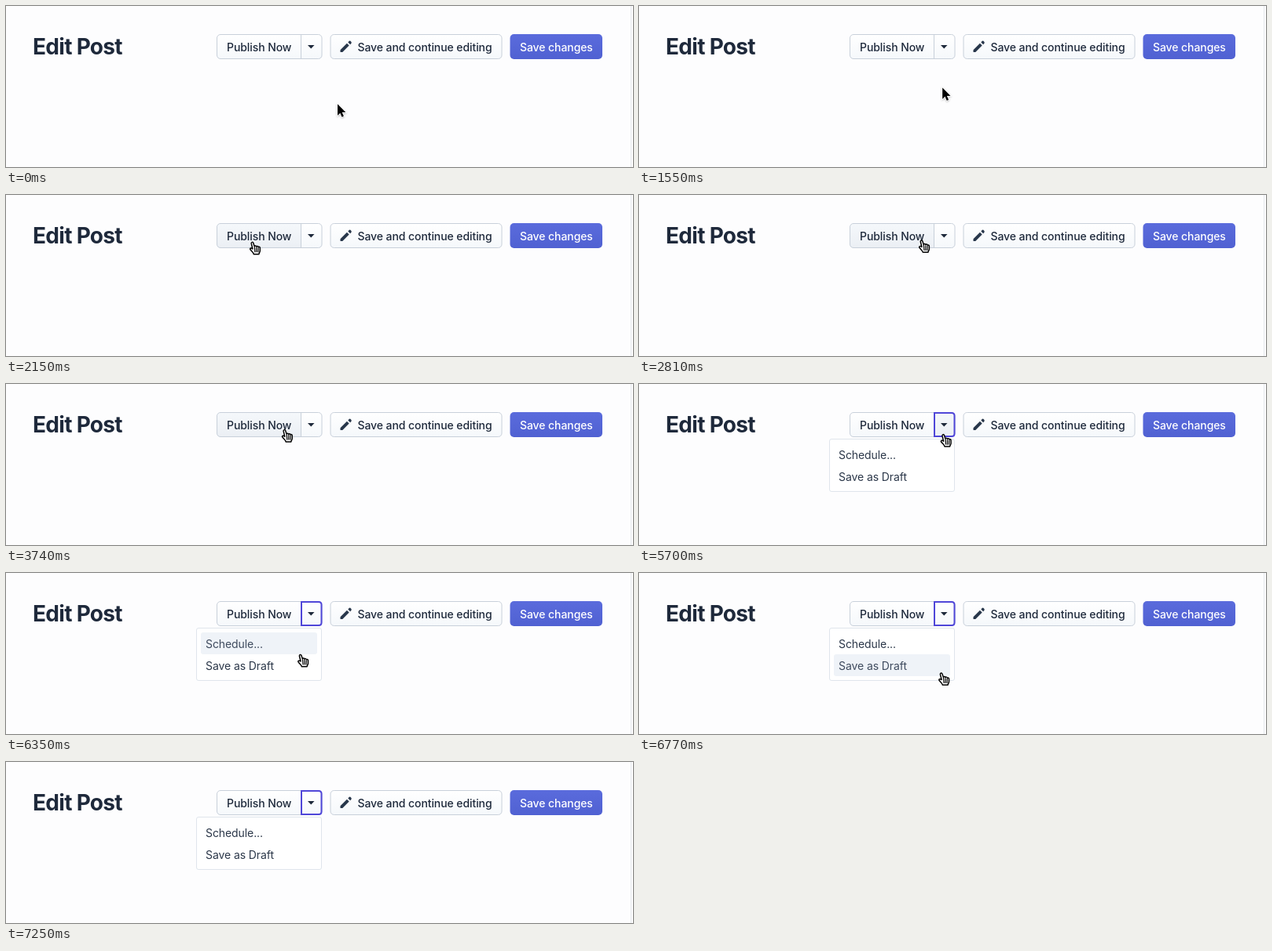
An HTML page that plays this animation: 798 px wide and 206 px high, repeating every 8.03 s.

```html
<!DOCTYPE html>
<html lang="en">
<head>
<meta charset="utf-8">
<title>Edit Post</title>
<style>
  html, body { margin: 0; width: 100%; height: 100%; overflow: hidden; background: #fdfdfe; }
  svg { display: block; }
  text { font: 500 14px Inter, sans-serif; letter-spacing: -.006em; fill: #1e293b; }
  .title { font-size: 28px; font-weight: 700; letter-spacing: -.025em; }
  .item { font-weight: 400; fill: #2b3749; }
  .item.hover { fill: #3f4b5e; }
  .edge { fill: none; stroke: #c8d0da; }
</style>
</head>
<body>
<svg width="798" height="206" viewBox="0 0 798 206">
  <defs>
    <linearGradient id="light" x2="0" y2="1"><stop stop-color="#fff"/><stop offset="1" stop-color="#f5f8fb"/></linearGradient>
    <linearGradient id="dim" x2="0" y2="1"><stop stop-color="#f5f8fb"/><stop offset="1" stop-color="#ebeff4"/></linearGradient>
    <linearGradient id="blue" x2="0" y2="1"><stop stop-color="#5a6bdc"/><stop offset="1" stop-color="#5061d2"/></linearGradient>
    <clipPath id="group"><rect x="268" y="36" width="134.5" height="32" rx="5"/></clipPath>
    <filter id="shade" x="-50%" y="-50%" width="200%" height="200%">
      <feDropShadow dx="0" dy="1" stdDeviation="1" flood-opacity=".3"/>
    </filter>
  </defs>
  <path d="M795.5 0v206" stroke="#e5e8ec"/>
  <text class="title" x="34" y="62">Edit Post</text>

  <g clip-path="url(#group)">
    <rect id="publish" x="268" y="36" width="107" height="32"/>
    <rect id="more" x="375" y="36" width="28" height="32"/>
  </g>
  <rect class="edge" x="268.5" y="36.5" width="133.5" height="31" rx="4.5"/>
  <path class="edge" d="M375.5 37v30"/>
  <path id="ring" d="M376 37h22q3.500 0 3.500 3.500v23q0 3.500-3.500 3.500h-22z" fill="none" stroke="#4f46d8" stroke-width="2"/>
  <text x="281" y="57.500">Publish Now</text>
  <path d="M384 50h8.500l-4.250 4.500z" fill="#1e293b"/>

  <rect class="edge" style="fill:url(#light)" x="413" y="36.500" width="218" height="31" rx="4.500"/>
  <path transform="translate(422.500 42)" fill="#27364a" d="M13.600 3.600a2 2 0 1 1 2.800 2.800l-.8.800-2.800-2.800zM11.400 5.800L3 14.200V17h2.800l8.400-8.400z"/>
  <text x="447.500" y="57.500">Save and continue editing</text>
  <rect x="641.500" y="36" width="117.500" height="32" rx="5" fill="url(#blue)"/>
  <text x="654" y="57.500" style="fill:#fff">Save changes</text>

  <g id="menu">
    <rect x="242.500" y="70.500" width="159" height="67" rx="2.500" fill="#fff" stroke="#dfe5ec"/>
    <rect id="bar" x="248" width="148" height="28" rx="3" fill="#eff3f8"/>
    <text class="item" x="254" y="95.500">Schedule...</text>
    <text class="item" x="254" y="123.500">Save as Draft</text>
  </g>

  <path id="arrow" filter="url(#shade)" d="M0 0v14.500l3.300-3.100 2.200 5.100 2.400-1-2.200-5h4.600z" stroke="#fff" stroke-width="1.300" paint-order="stroke"/>
  <g id="hand" stroke="#000" stroke-linejoin="round">
    <path fill="#fff" stroke-width="1.500" d="M-.9 9L-2.600 2.300C-2.900.3-.6-.2 0 1.600L1.400 6C1.500 4.700 3.700 4.700 4 6.300 4.500 5.100 6.200 5.500 6.500 6.900 7.200 6 8.500 6.600 8.500 8v3.500c0 1.800-1.300 2.500-1.400 4.300H.4C.1 13.700-2.600 12-4.100 9.600-4.600 8.200-2.500 7.500-.9 9z"/>
    <path d="M1.500 6.500l.6 7M4 7v6.500M6.300 7.500l-.3 6" fill="none" stroke-width="1.200"/>
  </g>
</svg>
<script>
const LOOP = 8030, FOCUS = 4870, OPEN = 4990;

const smooth = p => p * p * (3 - 2 * p);
const speedUp = p => p * p;
const slowDown = p => Math.sin(p * Math.PI / 2);

// Each run carries the pointer on from where the last one left it
const home = [422, 125.5];
const runs = [
  { from: 1200, until: 1970, to: [331, 72], ease: smooth },
  { from: 2030, until: 2270, to: [311, 57], ease: slowDown },
  { from: 2510, until: 2930, to: [365, 57.5], ease: slowDown },
  { from: 3110, until: 3290, to: [346, 58], ease: smooth },
  { from: 3470, until: 4330, to: [388, 58.5], ease: smooth },
  { from: 4510, until: 4570, to: [390, 59.5], ease: smooth },
  { from: 5530, until: 6350, to: [376, 104], ease: smooth },
  { from: 6410, until: 7250, to: [422, 212], ease: speedUp },
];

// The pointer moves in steps of about 60 ms
function pointer(t) {
  let pos = home;
  for (const { from, until, to, ease } of runs) {
    if (t < from) break;
    const gaps = Math.ceil((until - from) / 60);
    const step = Math.floor((t - from) / (until - from) * gaps + .001) + 1;
    const e = ease(Math.min(1, step / (gaps + 1)));
    pos = pos.map((v, i) => v + (to[i] - v) * e);
  }
  return pos;
}

const $ = id => document.getElementById(id);
const show = (id, on) => $(id).setAttribute("visibility", on ? "inherit" : "hidden");
const shade = (id, on) => $(id).setAttribute("fill", `url(#${on ? "dim" : "light"})`);
const items = document.querySelectorAll(".item");

function draw(now) {
  const t = now % LOOP, [x, y] = pointer(t), open = t >= OPEN;
  const onButton = y > 36 && y < 69 && x > 268 && x < 403;
  const onMenu = open && y >= 70 && y < 138 && x < 402;
  const row = onMenu && y >= 76 && y < 132 ? (y < 105 ? 0 : 1) : -1;

  shade("publish", onButton && x < 375);
  shade("more", onButton && x >= 375);
  show("ring", t >= FOCUS);
  show("menu", open);
  show("bar", row >= 0);
  $("bar").setAttribute("y", 76 + 28 * row);
  items.forEach((el, i) => el.classList.toggle("hover", i === row));

  const hand = onButton || onMenu;
  show("hand", hand);
  show("arrow", !hand);
  for (const id of ["hand", "arrow"]) $(id).setAttribute("transform", `translate(${x} ${y})`);
  requestAnimationFrame(draw);
}
requestAnimationFrame(draw);
</script>
</body>
</html>
```
